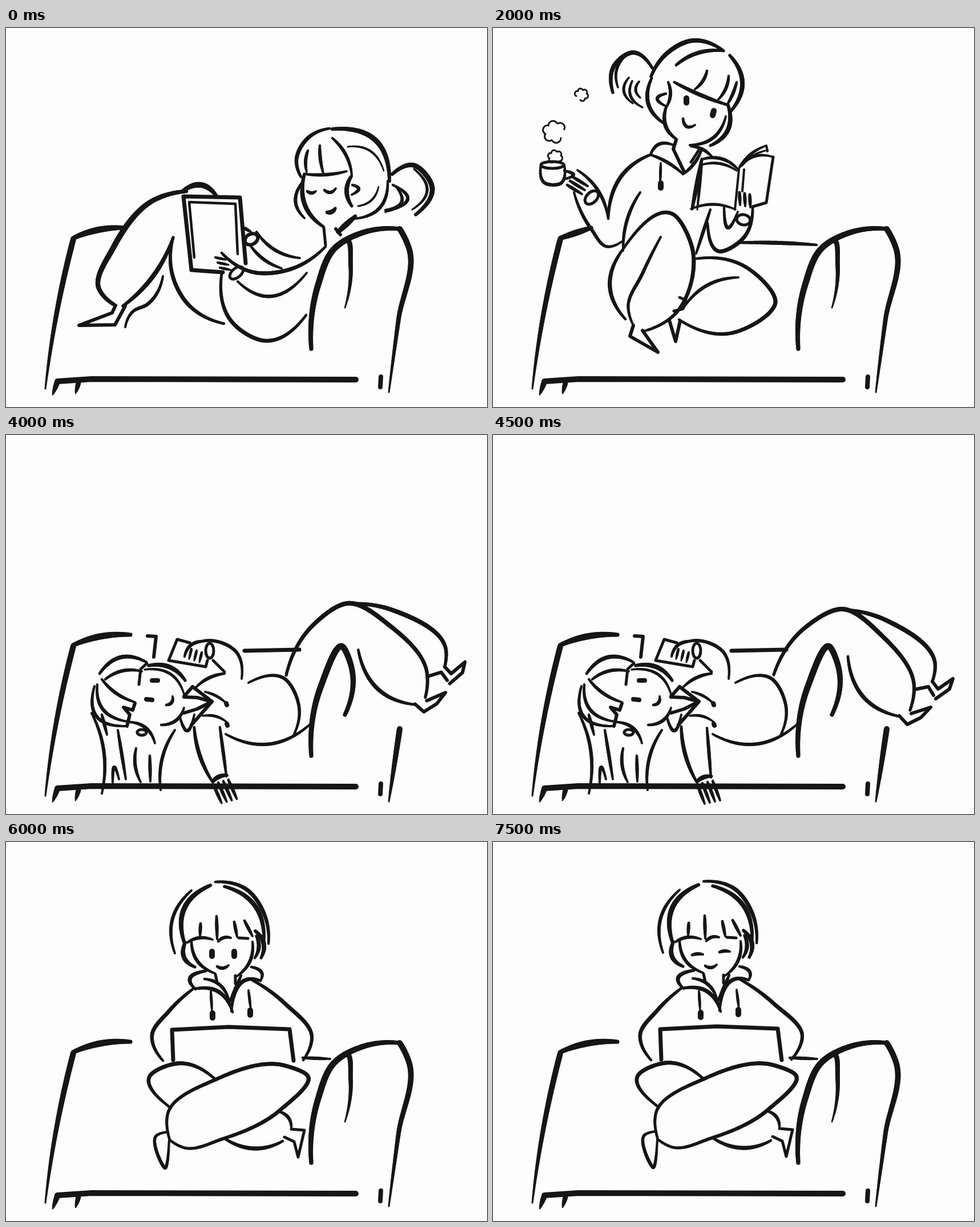
An HTML page with a canvas for the animation above (8 s loop, 843 px wide and 664 px high).

```html
<!DOCTYPE html>
<html lang="en">
<head>
<meta charset="utf-8">
<title>A day on the sofa</title>
<style>
html, body { margin: 0; width: 100%; height: 100%; overflow: hidden; background: #fdfdfd; }
canvas { display: block; }
</style>
</head>
<body>
<canvas id="stage" width="843" height="664"></canvas>
<script>
const ctx = document.getElementById('stage').getContext('2d');
const STEP = 500;

const swell = u => 0.65 + 0.35 * Math.sin(Math.PI * u);
const fade = u => 1 - 0.7 * u * u;

// Slopes of a smooth curve through values v at chord positions s
function slopes(v, s) {
  const n = v.length - 1;
  const d = v.slice(1).map((x, i) => (x - v[i]) / (s[i + 1] - s[i]));
  if (n === 1) return [d[0], d[0]];
  const m = v.map((_, i) => {
    if (i === 0 || i === n) return 0;
    const a = s[i] - s[i - 1], b = s[i + 1] - s[i];
    return (d[i - 1] * b + d[i] * a) / (a + b);
  });
  m[0] = 2 * d[0] - m[1];
  m[n] = 2 * d[n - 1] - m[n - 1];
  return m;
}

// Brush stroke through the points, its width shaped by a profile
function brush(profile, w, p) {
  const xs = p.filter((_, i) => i % 2 === 0), ys = p.filter((_, i) => i % 2);
  const s = [0];
  for (let i = 1; i < xs.length; i++)
    s.push(s[i - 1] + Math.hypot(xs[i] - xs[i - 1], ys[i] - ys[i - 1]));
  const mx = slopes(xs, s), my = slopes(ys, s), total = s[s.length - 1];
  let last = [xs[0], ys[0]];
  for (let i = 0; i < xs.length - 1; i++) {
    const h = s[i + 1] - s[i], steps = Math.max(4, Math.ceil(h / 4));
    for (let k = 1; k <= steps; k++) {
      const t = k / steps, q = t * t * (3 - 2 * t);
      const at = (v, m) => v[i] + (v[i + 1] - v[i]) * q +
        h * t * (1 - t) * (m[i] * (1 - t) - m[i + 1] * t);
      const next = [at(xs, mx), at(ys, my)];
      ctx.lineWidth = w * profile((s[i] + h * t) / total);
      ctx.beginPath();
      ctx.moveTo(...last);
      ctx.lineTo(...next);
      ctx.stroke();
      last = next;
    }
  }
}

const pen = (w, ...p) => brush(swell, w, p);
const tail = (w, ...p) => brush(fade, w, p);

function poly(w, ...p) {
  ctx.lineWidth = w;
  ctx.beginPath();
  for (let i = 0; i < p.length; i += 2) ctx.lineTo(p[i], p[i + 1]);
  ctx.stroke();
}

function ring(w, x, y, rx, ry, deg = 0) {
  ctx.lineWidth = w;
  ctx.beginPath();
  ctx.ellipse(x, y, rx, ry, deg * Math.PI / 180, 0, 2 * Math.PI);
  ctx.stroke();
}

// Upright drop for eyes and cord ends
function drop(x, y, lean = 0) {
  poly(10, x + lean, y - 4, x - lean, y + 4);
}

// Evenly spaced short strokes
function fan(w, n, x, y, dx, dy, sx, sy) {
  for (let i = 0; i < n; i++)
    pen(w, x + i * sx, y + i * sy, x + i * sx + dx, y + i * sy + dy);
}

function moved(draw, dx, dy, deg = 0, px = 0, py = 0) {
  ctx.save();
  ctx.translate(px + dx, py + dy);
  ctx.rotate(deg * Math.PI / 180);
  ctx.translate(-px, -py);
  draw();
  ctx.restore();
}

function sofa(backEnd, lying) {
  tail(10, 118, 370, 91, 488, 69, 632);
  pen(11, 118, 368, 160, 354, backEnd, 350);
  poly(10, 90, 619, 150, 615, 613, 616);
  tail(10, 90, 620, 82, 642);
  tail(9, 127, 622, 122, 640);
  poly(8, 657, 611, 656, 629);
  if (lying) {
    pen(11, 535, 562, 552, 440, 590, 371, 605, 405, 594, 490);
    tail(10, 690, 515, 671, 642);
  } else {
    pen(11, 535, 562, 547, 450, 575, 387, 630, 357, 690, 352);
    tail(10, 690, 352, 706, 385, 688, 510, 671, 638);
    tail(9, 581, 382, 597, 372, 604, 415, 594, 490);
  }
}

// ---- Reading with a tablet ----
function tabletBody() {
  pen(10, 316, 286, 262, 300, 188, 385, 163, 457, 190, 485);
  pen(10, 312, 284, 342, 275, 368, 293);
  pen(8, 205, 487, 259, 433, 293, 367);
  pen(7, 293, 367, 291, 430, 320, 485, 382, 518);
  poly(6, 192, 486, 186, 499, 128, 521, 191, 520, 209, 487);
  pen(6, 275, 435, 248, 484, 222, 497, 209, 524);
  poly(7, 420, 412, 410, 297, 311, 295, 325, 424, 380, 428);
  poly(4.5, 330, 402, 321, 305, 402, 308, 406, 396);
  fan(5, 3, 367, 402, 19, 4, 4, 9);
  pen(7, 378, 394, 430, 427, 490, 425, 560, 383);
  ring(5, 404, 429, 14, 8, -40);
  pen(6, 406, 444, 455, 470, 527, 429);
  pen(7, 378, 430, 396, 515, 455, 548, 526, 503);
  poly(5, 557, 350, 560, 380);
  poly(6, 578, 352, 586, 362);
}

function sideHead() {
  pen(9, 677, 256, 712, 240, 747, 280, 718, 327);
  pen(6, 678, 275, 704, 297, 665, 322);
  pen(6, 665, 319, 694, 303, 685, 280);
  pen(5, 715, 247, 738, 285, 712, 318);
  pen(8, 523, 256, 526, 315, 556, 348);
  pen(6, 521, 268, 508, 308, 523, 333);
  pen(6, 529, 215, 525, 234, 527, 252);
  pen(6, 550, 206, 551, 230, 556, 254);
  pen(6, 669, 268, 655, 315, 612, 334);
  pen(7, 517, 261, 509, 232, 530, 192, 567, 176);
}

function openEyes() {
  drop(545, 278);
  drop(597, 279, 1);
}

function calmHead(awake) {
  pen(9, 572, 177, 648, 197, 672, 268);
  pen(6, 525, 256, 560, 257, 597, 251);
  pen(6, 572, 193, 597, 225, 606, 258);
  pen(4, 599, 208, 636, 214, 662, 250);
  pen(4, 617, 312, 639, 303, 653, 278);
  pen(8, 605, 260, 597, 285, 606, 312);
  pen(6, 607, 275, 618, 281, 606, 292);
  pen(10, 582, 357, 612, 330);
  if (awake) openEyes();
  else {
    pen(6, 528, 286, 535, 289, 543, 286);
    pen(6, 558, 284, 568, 288, 578, 281);
  }
  pen(8, 563, 323, 571, 322, 577, 316);
}

function brightHead() {
  pen(7, 571, 176, 648, 197, 674, 264);
  pen(9, 600, 180, 627, 202, 640, 236);
  pen(6, 526, 256, 590, 262, 632, 257);
  pen(5, 585, 217, 589, 256);
  pen(9, 638, 263, 626, 290, 634, 318);
  pen(6, 634, 293, 643, 302, 630, 310);
  pen(6, 626, 318, 606, 342, 582, 357);
  openEyes();
  pen(6, 550, 308, 572, 326, 592, 312);
  ring(5, 587, 311, 5, 5);
}

function lowArm() {
  pen(6, 417, 350, 429, 357);
  ring(6, 430, 370, 12, 9, -30);
  pen(6, 439, 357, 470, 388, 515, 403);
  pen(6, 429, 382, 450, 404, 483, 421);
}

function raisedArm() {
  fan(6, 3, 445, 297, 8, 28, 10, -3);
  poly(5, 453, 324, 456, 342);
  poly(5, 475, 326, 470, 342);
  pen(6, 483, 309, 471, 317, 483, 321);
  ring(6, 464, 352, 14, 8, -10);
  pen(6, 456, 362, 464, 398, 482, 422);
  pen(6, 480, 358, 487, 390, 515, 404);
}

function bulb(rays) {
  pen(7, 423, 204, 398, 178, 418, 164, 436, 183, 434, 204);
  poly(5, 424, 211, 437, 206, 440, 214, 425, 221, 422, 209);
  pen(9, 414, 193, 424, 194, 432, 193);
  pen(6, 443, 207, 472, 197, 495, 215);
  for (const deg of [184, 235, 294]) {
    if (!rays) break;
    moved(() => poly(6, 447, 183, 447 + rays, 183), 0, 0, deg, 417, 183);
  }
}

function tabletScene(i) {
  sofa(207);
  tabletBody();
  sideHead();
  if (i < 2) calmHead(i === 1);
  else brightHead();
  if (i === 0) return lowArm();
  moved(raisedArm, 0, 0, i === 1 ? -8 : 0, 490, 415);
  bulb([0, 0, 8, 14][i]);
}

// ---- Coffee and a book ----
function puff(x, y, r, gap) {
  ctx.lineWidth = 3;
  for (let k = 0; k < 6; k++) {
    if (k === gap) continue;
    const a = k * Math.PI / 3 + 0.3;
    ctx.beginPath();
    ctx.arc(x + r * 0.62 * Math.cos(a), y + r * 0.55 * Math.sin(a), r * 0.38, a - 1.4, a + 1.2);
    ctx.stroke();
  }
}

function coffeeHead() {
  pen(8, 210, 113, 213, 65, 245, 43, 279, 70);
  pen(5, 219, 104, 217, 72, 235, 47);
  pen(5, 238, 87, 229, 108, 245, 132);
  pen(5, 244, 93, 240, 115, 262, 139);
  pen(5, 256, 94, 250, 108, 258, 122);
  pen(8, 277, 85, 302, 47, 350, 22, 404, 40);
  pen(7, 321, 65, 355, 45, 404, 40);
  pen(8, 415, 48, 437, 95, 415, 148);
  pen(7, 278, 88, 272, 132, 301, 168);
  pen(7, 318, 95, 375, 122, 412, 135);
  pen(6, 375, 75, 367, 94, 354, 107);
  pen(6, 413, 84, 408, 106, 395, 125);
  pen(6, 427, 95, 420, 116, 410, 135);
  pen(8, 412, 135, 411, 180, 381, 206);
  pen(6, 303, 115, 288, 123, 303, 137);
  pen(6, 307, 95, 311, 115, 303, 140);
  pen(7, 303, 140, 303, 173, 322, 195);
  pen(6, 345, 205, 385, 193, 408, 155);
  drop(339, 127);
  drop(386, 149, 1);
  pen(6, 333, 159, 340, 173, 354, 170);
}

function hoodieTop() {
  pen(6, 276, 222, 290, 204, 318, 206);
  pen(6, 276, 222, 310, 238, 333, 256);
  pen(6, 333, 256, 352, 238, 366, 212);
  poly(6, 321, 196, 316, 212, 334, 250);
  poly(5, 360, 215, 347, 235);
  pen(6, 347, 207, 366, 212, 385, 227);
  pen(5, 294, 237, 293, 272);
  drop(294, 276);
  pen(7, 276, 222, 233, 250, 202, 334);
  pen(6, 202, 334, 183, 283, 148, 249);
  pen(6, 142, 288, 172, 352, 200, 383, 226, 374);
  pen(6, 258, 288, 237, 330, 228, 390);
  ring(5, 173, 297, 14, 9, -45);
  fan(6, 3, 130, 275, 26, 16, 5, -7);
  pen(6, 405, 315, 412, 350, 429, 322);
  pen(7, 376, 342, 395, 391, 437, 370, 455, 313);
  pen(6, 381, 318, 370, 352, 356, 395);
  ring(5, 439, 336, 12, 9, 10);
}

function crouch() {
  pen(7, 226, 390, 315, 326, 349, 385, 315, 505, 265, 531);
  pen(7, 226, 390, 205, 455, 232, 510);
  pen(6, 294, 366, 262, 430, 237, 490, 246, 521);
  poly(6, 246, 521, 240, 540, 289, 568, 262, 530);
  pen(7, 357, 404, 440, 417, 495, 480, 415, 535, 326, 511);
  pen(6, 430, 437, 375, 451, 334, 490);
  poly(5, 327, 472, 338, 477, 333, 492, 317, 496);
  poly(6, 309, 512, 320, 549, 328, 513);
}

function cup() {
  ring(5, 104, 240, 20, 6);
  pen(6, 84, 240, 90, 271, 119, 272, 125, 240);
  pen(6, 125, 250, 141, 257, 124, 265);
  puff(109, 226, 13, 1);
}

function book(turn) {
  pen(8, 366, 230, 349, 317);
  pen(5, 366, 240, 358, 318);
  pen(5, 347, 317, 385, 309, 425, 318);
  pen(6, 366, 230, 400, 229, 430, 248);
  pen(5, 368, 239, 400, 238, 427, 250);
  poly(4, 431, 248, 424, 318);
  poly(4, 440, 248, 437, 286);
  pen(5, 431, 246, 458, 225, 491, 226);
  poly(5, 491, 226, 479, 306, 455, 313);
  pen(4, 437, 241, 457, 223, 482, 214);
  fan(6, 3, 432, 288, 1, 22, 9, 2);
  // the loose page swings from right to left
  const x = 479 - 92 * turn, y = 206 + 6 * turn - 14 * Math.sin(Math.PI * turn);
  pen(5, 432, 243, (432 + x) / 2, y + 12, x, y);
  poly(4, x, y, x + 2, y + 10);
}

const STEAM = [
  [[108, 182, 21], [155, 117, 12]],
  [[107, 168, 21], [146, 123, 14]],
  [[118, 108, 13], [147, 141, 13], [112, 180, 15]],
  [[109, 151, 14], [145, 157, 14], [141, 183, 14]]
];

function coffeeScene(i) {
  sofa(172);
  pen(7, 433, 376, 480, 376, 567, 380);
  coffeeHead();
  hoodieTop();
  crouch();
  cup();
  book(i / 3);
  STEAM[i].forEach(([x, y, r], k) => puff(x, y, r, (i + 2 * k) % 6));
}

// ---- Lying down ----
function lyingHead() {
  pen(7, 164, 418, 203, 389, 246, 398);
  pen(6, 174, 428, 205, 413, 238, 414);
  poly(5, 247, 400, 236, 410, 233, 437);
  pen(8, 250, 404, 290, 408, 314, 430);
  pen(5, 243, 411, 290, 420, 313, 458);
  pen(6, 155, 440, 158, 492, 212, 510);
  pen(6, 160, 437, 168, 478, 213, 502);
  pen(6, 168, 428, 194, 453, 226, 468);
  poly(6, 226, 470, 222, 482, 206, 477, 217, 490, 212, 510);
  poly(8, 256, 430, 266, 430);
  poly(8, 246, 463, 256, 464);
  pen(6, 281, 473, 290, 469, 292, 458);
  pen(6, 272, 508, 298, 500, 312, 478);
  pen(6, 218, 503, 245, 513, 261, 540);
  ring(5, 238, 521, 8, 5);
  pen(6, 150, 487, 170, 545, 168, 628);
  pen(6, 168, 490, 177, 525);
  pen(6, 196, 517, 203, 560, 210, 603);
  pen(6, 228, 549, 226, 575, 236, 608);
  pen(6, 252, 562, 253, 607);
  pen(6, 296, 517, 273, 570, 271, 622);
  pen(6, 187, 608, 190, 582, 198, 603);
}

function lyingBody() {
  poly(6, 248, 352, 263, 353, 259, 389);
  poly(7, 418, 378, 514, 376);
  poly(5, 322, 364, 300, 358, 285, 395, 350, 406, 353, 395);
  fan(5, 3, 325, 375, -4, 17, 9, 3);
  pen(6, 313, 388, 322, 370, 350, 361);
  ring(5, 357, 378, 7, 13);
  pen(6, 325, 368, 355, 360, 405, 382, 413, 427);
  poly(5, 363, 395, 383, 415);
  pen(6, 383, 418, 357, 425, 333, 442);
  poly(6, 312, 458, 327, 441, 361, 467, 325, 508);
  poly(6, 312, 459, 335, 460, 361, 467, 335, 480, 312, 487);
  pen(6, 305, 495, 317, 518, 330, 490);
  pen(5, 349, 450, 370, 458, 386, 470);
  pen(5, 345, 492, 368, 493, 387, 503);
  poly(8, 386, 470, 387, 473);
  poly(8, 387, 506, 388, 509);
  pen(6, 385, 524, 455, 542, 535, 505);
  pen(6, 425, 434, 485, 425, 514, 480, 503, 528);
}

function danglingArm() {
  pen(7, 330, 511, 337, 560, 357, 608);
  pen(6, 375, 513, 382, 600);
  pen(8, 358, 607, 368, 600, 383, 598);
  fan(6, 4, 358, 612, 13, 34, 9, -2);
}

function legs() {
  pen(8, 492, 420, 550, 335, 612, 305, 680, 350, 738, 440, 731, 482);
  pen(8, 615, 306, 690, 325, 775, 405, 770, 432);
  pen(7, 622, 388, 655, 465, 712, 493);
  poly(6, 712, 492, 726, 507, 750, 495, 767, 477, 733, 488);
  poly(6, 738, 446, 763, 441, 772, 456);
  poly(6, 770, 432, 780, 445, 806, 427, 800, 445, 776, 462);
}

function lyingScene(i) {
  sofa(218, true);
  lyingHead();
  lyingBody();
  moved(danglingArm, 0, 0, [-3, 0, 2, -2][i], 352, 515);
  moved(legs, 0, 0, [-5.5, 0, 2, -5][i], 500, 430);
}

// ---- Laptop ----
function frontHead(asleep) {
  pen(6, 325, 85, 291, 138, 296, 195);
  pen(9, 358, 76, 313, 115, 313, 178);
  pen(7, 367, 70, 420, 82, 454, 130, 460, 178);
  pen(8, 383, 78, 435, 110, 452, 172);
  pen(6, 318, 176, 333, 169, 362, 171);
  pen(6, 372, 174, 384, 167, 394, 168);
  poly(5, 408, 168, 424, 169);
  pen(6, 341, 143, 340, 165);
  pen(6, 369, 130, 370, 170);
  pen(6, 400, 140, 405, 166);
  pen(6, 418, 138, 432, 165);
  pen(8, 314, 176, 312, 202, 331, 219);
  pen(8, 437, 156, 452, 180, 447, 203);
  pen(7, 439, 165, 443, 185, 436, 203);
  pen(6, 325, 172, 335, 208, 366, 230);
  pen(6, 432, 175, 427, 210, 405, 235);
  if (asleep) {
    pen(6, 347, 199, 356, 197, 366, 198);
    pen(6, 395, 194, 404, 192, 413, 193);
  } else {
    drop(361, 196);
    drop(400, 196);
  }
  pen(6, 370, 218, 380, 221, 390, 216);
}

function laptopBody(elbow) {
  pen(7, 350, 226, 322, 242, 332, 258);
  pen(7, 332, 257, 372, 262, 397, 298);
  pen(6, 348, 240, 370, 247, 391, 278);
  pen(6, 430, 219, 449, 232, 446, 243);
  pen(7, 446, 243, 428, 240, 395, 296);
  poly(5, 367, 232, 370, 246);
  poly(5, 402, 234, 402, 248);
  pen(6, 412, 234, 392, 280);
  pen(5, 359, 262, 361, 296);
  pen(5, 425, 260, 429, 293);
  drop(362, 304);
  drop(428, 299);
  pen(7, 327, 258, 285, 297, 256, 338, 275, 383);
  pen(7, 428, 240, 490, 284, 536 + elbow, 342, 521, 382);
  poly(7, 293, 382, 291, 329, 390, 324, 497, 328, 504, 383);
  pen(7, 368, 417, 300, 388, 251, 412, 289, 466);
  pen(7, 287, 522, 283, 478, 370, 415, 490, 392, 529, 410, 480, 470, 380, 520, 310, 535, 287, 522);
  pen(6, 478, 472, 495, 483, 500, 503);
  poly(5, 500, 503, 523, 505, 512, 552, 505, 525, 488, 517);
  pen(7, 384, 520, 440, 537, 485, 524);
  pen(6, 284, 508, 264, 514, 279, 571, 286, 520);
}

function laptopScene(i) {
  sofa(218);
  pen(6, 520, 378, 568, 380);
  const [dx, dy, elbow] = [[0, 0, 0], [-1, 1, 14], [1, 4, 4], [2, -1, 4]][i];
  moved(() => {
    frontHead(i === 3);
    laptopBody(elbow);
  }, dx, dy);
}

const SCENES = [tabletScene, coffeeScene, lyingScene, laptopScene];
let shown = -1;

function frame() {
  const step = Math.floor(performance.now() / STEP) % 16;
  if (step !== shown) {
    shown = step;
    ctx.fillStyle = '#fdfdfd';
    ctx.fillRect(0, 0, 843, 664);
    ctx.strokeStyle = '#161616';
    ctx.lineCap = ctx.lineJoin = 'round';
    SCENES[step >> 2](step % 4);
  }
  requestAnimationFrame(frame);
}
frame();
</script>
</body>
</html>
```
